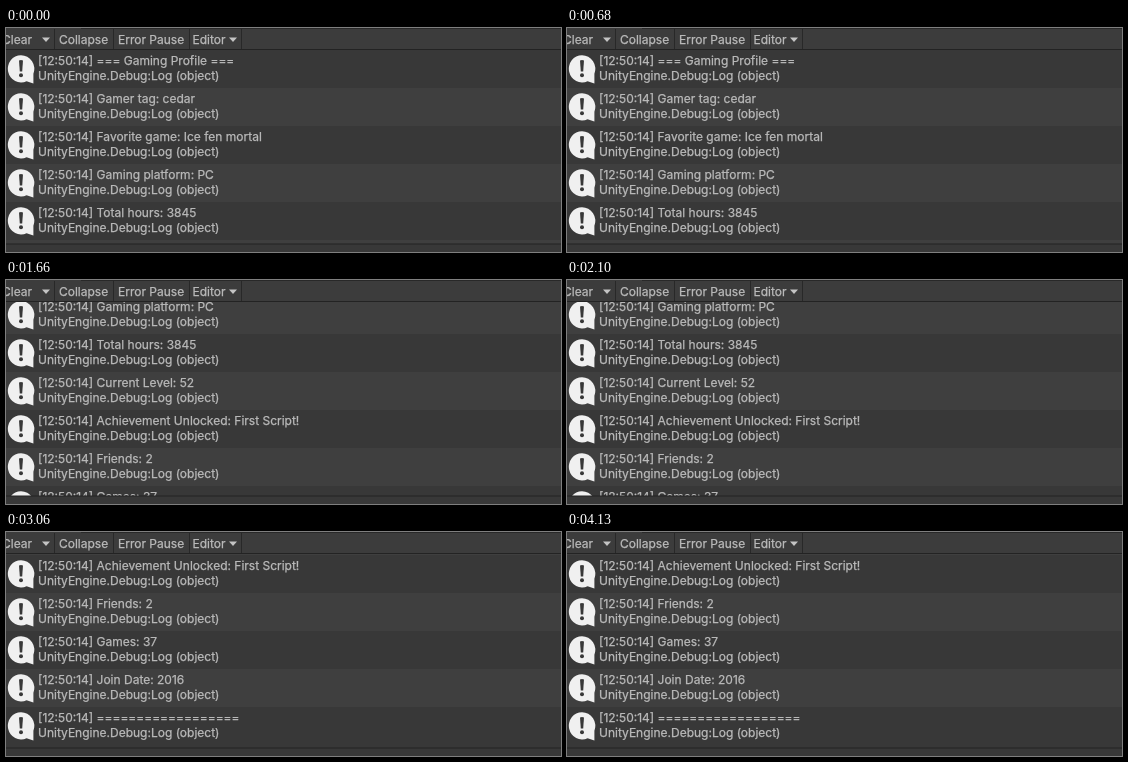
Write an HTML page that moves like this. It is 555 px wide and 224 px high and loops after 4850 ms.

```html
<!DOCTYPE html>
<html lang="en">
<head>
<meta charset="utf-8">
<title>Console log</title>
<style>
  html, body { margin: 0; width: 100%; height: 100%; overflow: hidden; background: #383838; }
  svg { display: block; width: 100%; height: 100%; }
  text { font: 12px Inter, sans-serif; fill: #bababa; stroke: #bababa; stroke-width: .25px; white-space: pre; }
</style>
</head>
<body>
<svg viewBox="0 0 555 224">
  <defs>
    <clipPath id="view"><rect y="22" width="555" height="194"/></clipPath>
    <g id="info">
      <path fill="#f0f0f0" d="M15 5.2A13.3 13.6 0 0 1 27.4 23.8V33.4L20.6 31.2A13.3 13.6 0 1 1 15 5.2Z"/>
      <path fill="#383838" d="M13 10.6Q15 9.4 17 10.6L16.2 21.6H13.8Z"/>
      <circle cx="15" cy="25.2" r="2" fill="#383838"/>
    </g>
  </defs>
  <rect width="555" height="224" fill="#383838"/>
  <g clip-path="url(#view)"><g id="list"></g></g>
  <rect y="215.5" width="555" height="1" fill="#232323"/>
  <rect width="555" height="21" fill="#3c3c3c"/>
  <rect x="75" width="480" height="1" fill="#282828"/>
  <rect y="21" width="555" height="1" fill="#232323"/>
  <g id="bar"></g>
</svg>
<script>
const TOP = 22, ROW = 38, LOOP = 4850;
const messages = [
  '=== Gaming Profile ===',
  'Gamer tag: cedar',
  'Favorite game: Ice fen mortal',
  'Gaming platform: PC',
  'Total hours: 3845',
  'Current Level: 52',
  'Achievement Unlocked: First Script!',
  'Friends: 2',
  'Games: 37',
  'Join Date: 2016',
  '='.repeat(18)
];
// [start time, scroll offset]
const steps = [[0, 0], [1130, 60], [1660, 120], [2390, 180], [3060, 227]];

const list = document.getElementById('list');
const bar = document.getElementById('bar');

function add(parent, tag, attrs, content = '') {
  const el = document.createElementNS('http://www.w3.org/2000/svg', tag);
  for (const key in attrs) el.setAttribute(key, attrs[key]);
  el.textContent = content;
  parent.append(el);
}

messages.forEach((message, i) => {
  const y = TOP + i * ROW;
  add(list, 'rect', { y, width: 555, height: ROW, fill: i % 2 ? '#3f3f3f' : '#383838' });
  add(list, 'use', { href: '#info', y });
  add(list, 'text', { x: 32, y: y + 15 }, `[12:50:14] ${message}`);
  add(list, 'text', { x: 32, y: y + 29.5 }, 'UnityEngine.Debug:Log (object)');
});

for (const [x, label] of [[-4, 'Clear'], [53, 'Collapse'], [112, 'Error Pause'], [186.5, 'Editor']])
  add(bar, 'text', { x, y: 15.5 }, label);
for (const x of [48, 107, 183, 235])
  add(bar, 'rect', { x, y: 1, width: 1, height: 20, fill: '#282828' });
for (const x of [36, 223])
  add(bar, 'path', { d: `M${x} 9.5h8l-4 4.5z`, fill: '#c4c4c4' });

function draw(now) {
  const t = now % LOOP;
  const scroll = steps.filter(([start]) => t >= start).pop()[1];
  list.setAttribute('transform', `translate(0 ${-scroll})`);
}

function tick() {
  draw(performance.now());
  requestAnimationFrame(tick);
}
tick();
</script>
</body>
</html>
```
